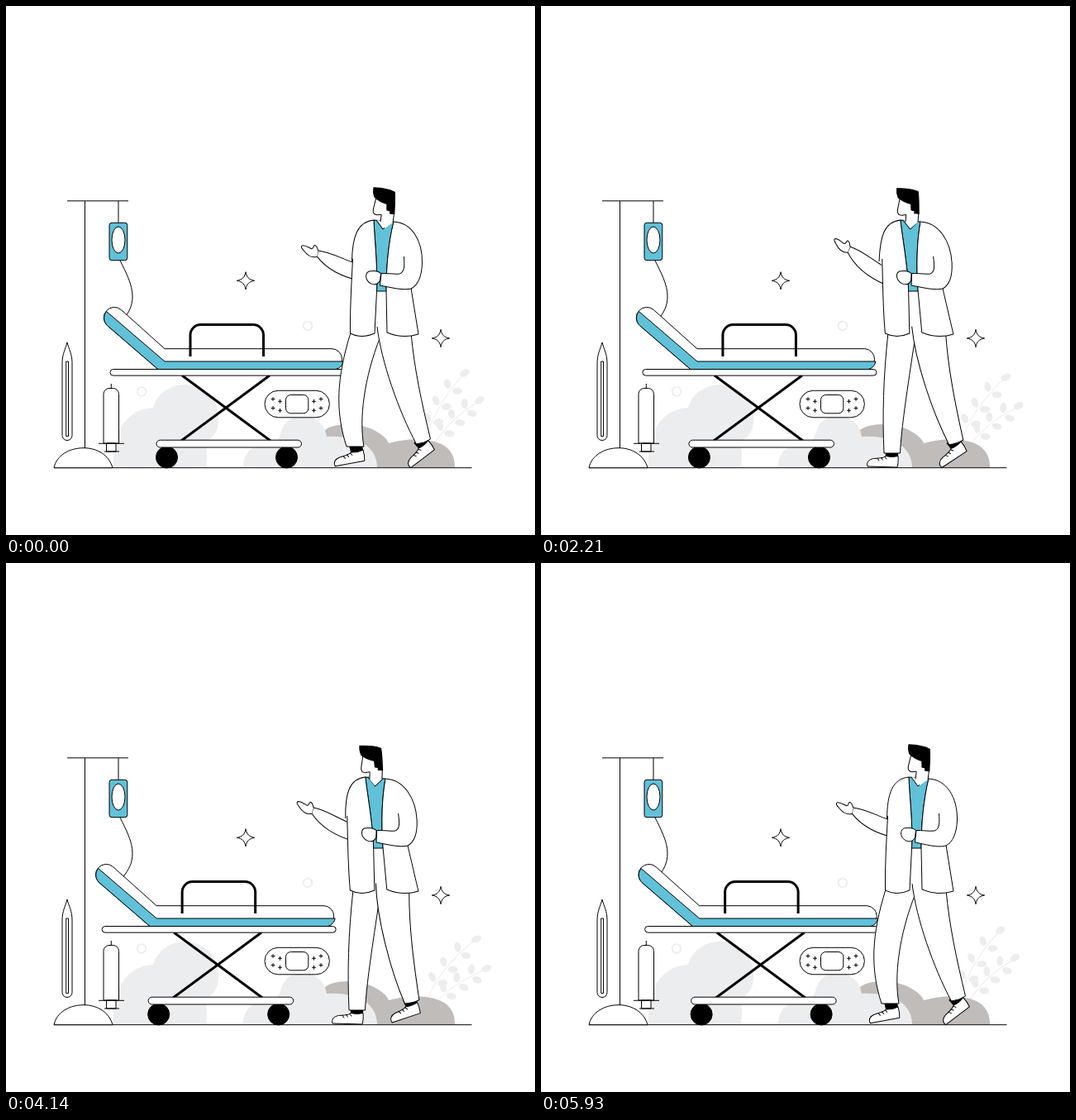
An HTML page with a canvas that plays this animation: 640 by 640 pixels, repeating every 6000 ms.

```html
<!DOCTYPE html>
<html lang="en">
<head>
<meta charset="utf-8">
<title>Doctor and stretcher</title>
<style>
html, body { margin: 0; width: 100%; height: 100%; overflow: hidden; background: #fff; }
canvas { display: block; width: 100vw; height: 100vh; }
</style>
</head>
<body>
<canvas id="stage" width="640" height="640"></canvas>
<script>
const ctx = document.getElementById('stage').getContext('2d');
const LOOP = 6000;
const BLACK = '#000', WHITE = '#fff', BLUE = '#60c1d8', PALE = '#ecedef', STONE = '#c0bcb9';

const lerp = (a, b, k) => a + (b - a) * k;

// Nearly linear, with slightly softened ends
function ramp(t, from, to) {
  const k = Math.min(1, Math.max(0, (t - from) / (to - from)));
  return lerp(k, k * k * (3 - 2 * k), .3);
}
const pulse = (t, from, peak, to) => ramp(t, from, peak) - ramp(t, peak, to);

function poseAt(t) {
  const lean = ramp(t, 0, 1150) - ramp(t, 4660, 5920);
  const lift = pulse(t, 1420, 2220, 3650) + pulse(t, 3800, 4570, 5850);
  return {
    lean, lift,
    bed: -11.6 * (pulse(t, 0, 1260, 2600) + pulse(t, 2950, 4400, 6000)),
    plant: 11.4 * (pulse(t, 0, 1400, 2800) + pulse(t, 2950, 4480, 6000)),
    step: pulse(t, 300, 1400, 2400) + pulse(t, 2500, 3720, 5500),
    head: 7.2 * (1 - lean) + 4.1 * lift,
    arm: 1.5 * (1 - lean) + 13 * lift
  };
}

// Blend two path strings that share the same commands
function mix(a, b, k) {
  const to = b.match(/-?[\d.]+/g);
  let i = 0;
  return a.replace(/-?[\d.]+/g, n => lerp(+n, +to[i++], k).toFixed(2));
}

function draw(d, fill, stroke = BLACK, width = 1) {
  const p = typeof d === 'string' ? new Path2D(d) : d;
  if (fill) { ctx.fillStyle = fill; ctx.fill(p); }
  if (stroke) { ctx.strokeStyle = stroke; ctx.lineWidth = width; ctx.stroke(p); }
}

function box(x, y, w, h, r, fill) {
  const p = new Path2D();
  p.roundRect(x, y, w, h, r);
  draw(p, fill);
}

function oval(x, y, rx, ry, fill, stroke, width, turn = 0) {
  const p = new Path2D();
  p.ellipse(x, y, rx, ry, turn, 0, Math.PI * 2);
  draw(p, fill, stroke, width);
}

function shift(x, y, paint) {
  ctx.save();
  ctx.translate(x, y);
  paint();
  ctx.restore();
}

function pivot(x, y, deg, paint) {
  shift(x, y, () => {
    ctx.rotate(deg * Math.PI / 180);
    ctx.translate(-x, -y);
    paint();
  });
}

// Tilt sideways, keeping the height y in place
function skew(y, k, paint) {
  ctx.save();
  ctx.transform(1, 0, k, 1, -k * y, 0);
  paint();
  ctx.restore();
}

function branch(x0, y0, x1, y1, x2, y2) {
  draw(`M${x0} ${y0}Q${x1} ${y1} ${x2} ${y2}`, null, PALE);
  for (let k = .27; k < .8; k += .25) {
    const ax = lerp(x0, x1, k), ay = lerp(y0, y1, k);
    const bx = lerp(x1, x2, k), by = lerp(y1, y2, k);
    const dir = Math.atan2(by - ay, bx - ax);
    for (const side of [-1, 1]) {
      const a = dir + side * .95;
      oval(lerp(ax, bx, k) + 9 * Math.cos(a), lerp(ay, by, k) + 9 * Math.sin(a), 6, 4, PALE, null, 0, a);
    }
  }
  oval(x2 + 3, y2 - 3, 6.2, 4, PALE, null, 0, -.55);
}

function sparkle(x, y) {
  shift(x, y, () => {
    const p = new Path2D('M0 -10.6');
    const arm = 10.6, near = 1.2, far = 4;
    p.bezierCurveTo(near, -far, far, -near, arm, 0);
    p.bezierCurveTo(far, near, near, far, 0, arm);
    p.bezierCurveTo(-near, far, -far, near, -arm, 0);
    p.bezierCurveTo(-far, -near, -near, -far, 0, -arm);
    draw(p, WHITE);
  });
}

function scenery(pose) {
  pivot(494, 537, pose.plant, () => {
    branch(508, 526, 516, 488, 552, 447);
    branch(515, 534, 536, 500, 570, 480);
  });
  draw('M385 514C395 504 425 503 445 513C455 518 461 524 463 529C490 521 520 523 533 534C541 541 543 549 543 558H440L388 525Z', STONE, null);
  draw('M130 558C128 525 140 488 178 486C183 468 200 458 217 458C240 459 257 475 257 497C258 515 251 521 241 528C244 540 243 550 242 558Z', PALE, null);
  draw('M287 558C287 541 298 529 320 528C327 528 330 524 332 518C336 502 346 496 360 496C376 497 386 507 388 521C420 519 449 530 449 558Z', PALE, null);
  oval(365, 387, 5.3, 5.3, null, PALE, 1.8);
  oval(164, 466.5, 5.3, 5.3, null, PALE, 1.8);
  draw('M58 558.7H563.5');
  sparkle(290, 332.3);
  sparkle(526, 402);
}

function drip() {
  draw('M74 235.8H148M95.5 236V535M136 236V262');
  draw('M138 308C145 322 153 337 153 351C153 363 149 370 141 381');
  box(125, 262.3, 21.8, 45.4, 3, BLUE);
  oval(136, 283, 8, 16, WHITE);
  draw('M58 558.7C61 544 76 534.7 94 534.7C111 534.7 125 544 129 558.7Z', WHITE);
}

function tools() {
  // Thermometer
  draw('M74 407C76 415 80 421 80 432V519.5A6 6 0 0 1 68 519.5V432C68 421 72 415 74 407Z', WHITE);
  box(72.7, 430, 2.8, 90.5, 0, WHITE);
  // Syringe
  draw('M127.3 457V463');
  box(118, 462.5, 18.5, 66.5, [7, 7, 0, 0], WHITE);
  box(121.5, 529, 11.5, 10, 0, WHITE);
  draw('M112 529.3H143M119 539H137');
  // Plaster
  box(313, 465.3, 78.4, 32.5, 16.2, WHITE);
  box(338.5, 470.5, 27.3, 22.3, 6, WHITE);
  for (const side of [-1, 1])
    for (let i = 0; i < 4; i++) {
      const col = i % 2, row = i >> 1;
      const x = 352 + side * (29 - 8.5 * col), y = 475.5 + 2.8 * col + 11 * row;
      draw(`M${x - 2.4} ${y}h4.8M${x} ${y - 2.4}v4.8`);
    }
}

function bed(pose) {
  const under = 'H184.5L122.5 386.5';
  shift(pose.bed, 0, () => {
    draw('M213 447L320 526M319 447L212 526', null, BLACK, 3);
    for (const x of [194.5, 339.5]) oval(x, 546, 13, 13, BLACK);
    box(182, 525.2, 175.5, 8.8, 4.4, WHITE);
    draw(`M139.5 367.7L192 414.7H395A12.7 12.7 0 0 1 395 440${under}A12.5 12.5 0 0 1 139.5 367.7Z`, WHITE);
    draw(`M121.5 369.5L192 430H408C407 436 402 440 395 440${under}C117.5 381.5 117.5 374.5 121.5 369.5Z`, BLUE);
    box(126, 439.5, 283, 7.6, 3.8, WHITE);
    draw('M223 424V398A12.5 12.5 0 0 1 235.5 385.6H299A12.5 12.5 0 0 1 311.5 398V424', null, BLACK, 3);
  });
}

// Sock and shoe, with the ankle at (x, y)
function foot(x, y, deg) {
  shift(x, y, () => pivot(0, 0, deg, () => {
    draw('M-8 -8H8L7.5 2H-7.5Z', BLACK, null);
    draw('M-7.5 .5Q0 2.500 7.5 .5C8 6 7.5 10 6.5 14L-29.500 13C-31 8 -28 4.500 -22 3.500C-15 3 -10 3 -7.5 .5Z', WHITE);
    for (let i = 0; i < 3; i++)
      draw(`M${-17.5 + 4.5 * i} ${3 - i}l2 3.500`);
  }));
}

function legs({ lean, step }) {
  const back = 1 - lean;
  foot(424.5, 544 - 6 * back, -12 * back);
  draw(mix('M417 395C400 450 398 490 412 533L433 533C427 500 433 450 453 400',
           'M420 395C414 450 413 495 415 541L434.5 541C436 510 443 465 452 405', lean), WHITE);
  pivot(455, 370, 6.3 * step, () => {
    foot(504.5, 530, -39 + 17.7 * step);
    draw('M449 388C454 430 475 490 496.5 530Q506 529 513.5 524C503 480 494 440 490 395', WHITE);
  });
}

function forearm({ lean, arm }) {
  shift(6.5 * (1 - lean), -3 * (1 - lean), () => pivot(411, 309, arm, () => {
    draw('M422 335C400 331 381 321 369.5 307L371 300C385 301 400 309 413 313', WHITE);
    draw('M369.5 307.5C364 309 358 306 354 301C351 298 349 295 352 294.3C356 294 360 297 363 298C366 298 364 294 367 293.5C370 295 370 298 371 300', WHITE);
  }));
}

function coat({ lean, lift }) {
  skew(398, .073 * lean, () => {
    draw('M445 259L469 261C463 285 460 315 460 345H448.5C450 315 446 285 445 259Z', BLUE);
    // Left side with sleeve
    const sleeve = `M445 259C425 261 419 279 ${418.5 - 3 * lift} 309`;
    const edge = '419.5 306C418 335 416 365 416.5 396Q430 403 446 396L448.5 345C450 315 446 285 445 259';
    draw(sleeve + 'L' + edge, WHITE, null);
    draw(sleeve);
    draw('M' + edge);
    // Right side, then its bent sleeve
    draw('M489 335L499 397Q480 403 461 395L460 345C460 315 463 285 469 261', WHITE);
    draw('M469 261C491 262 504 284 503.5 311C503 327 498 338 490 342C479 345 464 340 452.5 338L454 323.5C461 323 469 325 476 324C483 322 482 312 481.5 303', WHITE);
    draw('M453.5 323.5C450 320 444 320 439 321C435 323 435 328 436.5 331C439 336 445 338 449 336C451 335 452 333 452.5 332Z', WHITE);
    draw('M448 259L456 270L466 261', WHITE);
  });
}

function head({ lean, head }) {
  shift(10.5 * (1 - lean), 0, () => pivot(447, 290, head, () => {
    draw('M439 248V262L445.3 269L454 261V248Z', WHITE, null);
    draw('M439 253V262M454 250V261');
    draw('M450 234L430 233C430 240 428 245 428.5 250C429 253 431 254.3 434 254L439 253', WHITE);
    draw('M425.7 222C434 221.3 446 221.8 451.5 224C453.5 232 453.5 242 454.5 250.5H449V247.5L445 247L444 239.5C438 238.5 432 236 428 233C426 229 425.5 226 425.7 222Z', BLACK);
  }));
}

function frame(now) {
  const pose = poseAt(now % LOOP);
  ctx.fillStyle = WHITE;
  ctx.fillRect(0, 0, 640, 640);
  ctx.lineJoin = 'round';
  scenery(pose);
  drip();
  tools();
  bed(pose);
  legs(pose);
  forearm(pose);
  coat(pose);
  head(pose);
  requestAnimationFrame(frame);
}
requestAnimationFrame(frame);
</script>
</body>
</html>
```
